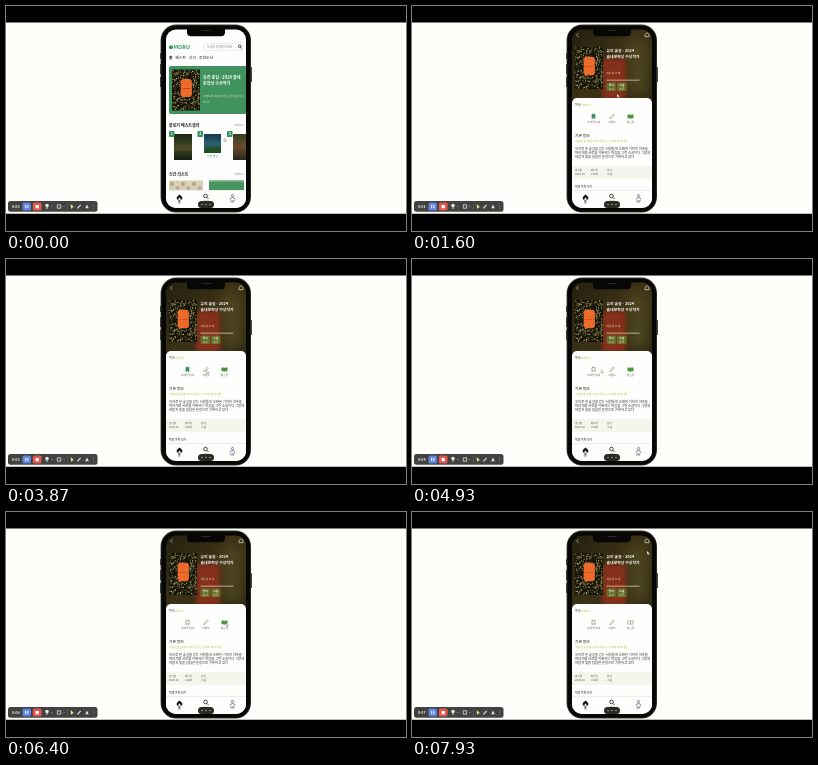
These frames come from a looping animation (400x225 px, 8 s). An HTML page with a canvas:

```html
<!DOCTYPE html>
<html lang="ko">
<head>
<meta charset="utf-8">
<style>
html, body { margin: 0; height: 100%; overflow: hidden; background: #000; }
canvas { display: block; width: 400px; height: 225px; }
</style>
</head>
<body>
<canvas id="stage" width="400" height="225"></canvas>
<script>
const ctx = document.getElementById('stage').getContext('2d');
const LOOP = 8000, OPEN_DETAIL = 1600, MARK_OFF = 4730, BOOK_OFF = 7270;
const GREEN = '#35935b', INK = '#1d1e1b', GRAY = '#7d7e76', OLIVE = '#b9b842', PAPER = '#fefefd';

// Pointer stops: time, x, y
const stops = [[0, 218, 132], [70, 218, 132], [1000, 205, 88], [1600, 205, 88],
  [2400, 232, 93], [2470, 232, 93], [3270, 201, 111], [3800, 201, 111],
  [4600, 182, 111], [4730, 182, 111], [5470, 221, 109], [5800, 221, 109],
  [6070, 220, 111], [7200, 220, 111], [7670, 235, 39], [8000, 235, 39]];

function rect(x, y, w, h, fill, r = 0) {
  ctx.fillStyle = fill;
  ctx.beginPath();
  ctx.roundRect(x, y, w, h, r);
  ctx.fill();
}
function dot(x, y, r, fill) {
  ctx.fillStyle = fill;
  ctx.beginPath();
  ctx.arc(x, y, r, 0, 7);
  ctx.fill();
}
function path(d, x, y, stroke, fill, width = .8) {
  const p = new Path2D(d);
  ctx.save();
  ctx.translate(x, y);
  if (fill) { ctx.fillStyle = fill; ctx.fill(p); }
  if (stroke) { ctx.strokeStyle = stroke; ctx.lineWidth = width; ctx.stroke(p); }
  ctx.restore();
}
function text(s, x, y, size, fill = INK, weight = 400, align = 'left') {
  ctx.font = `${weight} ${size}px "Noto Sans CJK KR", "Noto Sans CJK", "Noto Sans", sans-serif`;
  ctx.fillStyle = fill;
  ctx.textAlign = align;
  ctx.textBaseline = 'middle';
  ctx.fillText(s, x, y);
}
function gradient(x0, y0, x1, y1, ...colors) {
  const g = ctx.createLinearGradient(x0, y0, x1, y1);
  colors.forEach((c, i) => g.addColorStop(i / (colors.length - 1), c));
  return g;
}
function softRect(x, y, w, h, fill, blur) {
  ctx.save();
  ctx.filter = `blur(${blur}px)`;
  rect(x, y, w, h, fill, 4);
  ctx.restore();
}
function searchIcon(x, y, k, color) {
  ctx.strokeStyle = color;
  ctx.lineWidth = .8;
  ctx.beginPath();
  ctx.arc(x - .5 * k, y - .5 * k, 1.8 * k, 0, 7);
  ctx.moveTo(x + .8 * k, y + .8 * k);
  ctx.lineTo(x + 2.5 * k, y + 2.5 * k);
  ctx.stroke();
}

function speckledCover(x, y, w, h) {
  let seed = 17;
  const rnd = () => (seed = seed * 16807 % 2147483647) / 2147483647;
  rect(x, y, w, h, '#17160c');
  for (let i = 0; i < 330; i++) {
    const px = x + rnd() * (w - 1), py = y + rnd() * (h - 1);
    ctx.fillStyle = ['#b9a75c', '#71642c', '#d8cb91'][i % 3];
    ctx.fillRect(px, py, .9, .8);
  }
  rect(x + w * .31, y + h * .23, w * .4, h * .44, '#ee6a2a', 3);
  rect(x + w * .37, y + h * .45, w * .28, .7, '#a94119');
}

function listPage() {
  rect(160, 23, 80, 180, PAPER);
  dot(165, 41.3, 2, GREEN);
  text('MORU', 167.5, 41.3, 5.4, GREEN, 900);
  rect(197.5, 37, 40, 8, '#d9dfd4', 4);
  rect(198, 37.5, 39, 7, PAPER, 3.5);
  text('도서를 검색해 보세요', 201, 41, 2.9, GRAY);
  searchIcon(234, 40.7, .7, INK);
  text('홈', 163, 51.3, 3.8, INK, 700);
  text('베스트', 169.5, 51.3, 3.8);
  text('신간', 183, 51.3, 3.8);
  text('추천도서', 193, 51.3, 3.8);

  rect(163, 60, 80, 48, '#40935f', 2);
  speckledCover(166, 63.5, 28, 41);
  text('유리 숲길 - 2024 솔내', 197, 71, 4.1, '#fff', 700);
  text('문학상 수상작가', 197, 77, 4.1, '#fff', 700);
  text('오래도록 마음에 남는 문장들을 담은', 197, 90, 2.8, '#d5e5a8');
  text('더보기', 197, 96.5, 2.5, '#d5e5a8');

  text('블로거 베스트셀러', 163, 119.3, 4, INK, 700);
  text('전체보기', 238, 119.5, 2.6, GRAY, 400, 'right');
  rect(168, 128, 18, 26, gradient(0, 128, 0, 154, '#1d2517', '#3d4a24', '#171c14'));
  rect(168, 139, 18, 6, '#4a4721');
  rect(198, 128, 17, 19, gradient(0, 128, 0, 147, '#18384b', '#286070', '#1c5034'));
  path('M0 8 Q7 2 17 5 V10 H0Z', 198, 137, null, '#234d25');
  text('푸른 언덕', 206.5, 150, 2.8, GREEN, 400, 'center');
  text('· · · ·', 206.5, 153, 2.8, GRAY, 400, 'center');
  rect(227, 128, 13, 26, gradient(0, 128, 0, 154, '#344022', '#6a4b2c', '#242719'));
  [163, 191.5, 221].forEach((x, i) => {
    rect(x, 125, 5.5, 6, GREEN, .8);
    text(i + 1, x + 2.75, 128, 3.5, '#fff', 700, 'center');
  });

  text('신간 리스트', 163, 168, 4, INK, 700);
  text('전체보기', 238, 168, 2.6, GRAY, 400, 'right');
  rect(163, 174.5, 34, 12, '#d8cfb7');
  for (let i = 0; i < 6; i++) {
    dot(166 + i * 5.5, 178 + i % 2 * 4, 2, i % 2 ? '#c5a5a0' : '#aaa982');
  }
  rect(203, 174.5, 35, 12, '#46945f');
  rect(203, 174.5, 35, 1.5, '#78ae7e');
}

function detailHeader() {
  rect(160, 23, 80, 78, gradient(160, 23, 240, 94, '#232010', '#3c3115', '#2b2813'));
  softRect(216, 34, 20, 55, '#4d451f', 6);
  softRect(190, 52, 24, 42, '#85301a', 2);
  path('M1.5 -2 L-.5 0 L1.5 2', 165, 29, '#d2d1bd', null, .6);
  path('M-2 -.3 L0 -2 L2 -.3 V2 H-2Z', 235, 28.7, '#e4e3d0', null, .7);
  speckledCover(163, 41, 28, 42);
  text('유리 숲길 - 2024', 194.5, 44.7, 3.9, '#fff', 700);
  text('솔내문학상 수상작가', 194.5, 50.2, 3.9, '#fff', 700);
  text('지은이 소개', 194.5, 66.5, 2.8, '#f0ecd2', 500);
  rect(194.5, 73.8, 33, .8, '#d9d5b8');
  [194.5, 205].forEach((x, i) => {
    rect(x, 76.5, 9.5, 8.5, '#65702d', 1.2);
    text(i ? '소설' : '종이', x + 4.75, 79.2, 2.8, '#f5f2d8', 700, 'center');
    text(i ? '한국' : '도서', x + 4.75, 82.6, 2.6, '#f5f2d8', 400, 'center');
  });
}

function detailPage(t) {
  detailHeader();
  rect(160, 92, 80, 111, PAPER, [5, 5, 0, 0]);
  text('독서', 163, 99.3, 3, INK, 500);
  text('기록하기', 168.5, 99.3, 2.7, OLIVE);

  const marked = t < MARK_OFF, reading = t < BOOK_OFF, soft = '#7e936c';
  path('M-1.5 -2.2 H1.5 V2.3 L0 1 L-1.5 2.3Z', 181.5, 110.5,
    marked ? GREEN : soft, marked ? GREEN : null, .7);
  path('M-2.2 2.2 L-1.7 .5 L1.4 -2.5 L2.4 -1.5 L-.6 1.6Z', 200, 110.5, '#78a252', null, .6);
  path('M0 -1.4 Q-1.4 -2 -2.7 -1.6 V1.6 Q-1.4 1.2 0 1.8 Q1.4 1.2 2.7 1.6 V-1.6 Q1.4 -2 0 -1.4 V1.8',
    218.5, 110.5, reading ? '#4d973c' : soft, reading ? '#4d973c' : null, .6);
  [['내 책꽂이에', 181.5], ['코멘트', 200], ['읽는중', 218.5]].forEach(([s, x]) =>
    text(s, x, 116.3, 2.7, '#62685a', 400, 'center'));

  text('기본 정보', 163, 129.3, 3.8, INK, 500);
  text('조용한 숲길에서 다시 만나는 우리의 이야기들', 163, 135.3, 2.8, OLIVE);
  ['유리로 된 숲길을 걷는 사람들의 오래된 기억과 약속을',
    '따라가며 서로를 이해하는 마음을 그린 소설이다 그날의',
    '바람과 빛을 담담한 문장으로 기록하고 있다'].forEach((s, i) =>
    text(s, 163, 142.3 + i * 4.4, 3.35, '#2d2e2a'));
  rect(160, 160, 80, 13, '#f5f5ee');
  [['출간일', '2024.10'], ['페이지', '216쪽'], ['분야', '소설']].forEach(([a, b], i) => {
    text(a, 163 + i * 16, 164.2, 2.6, '#606156');
    text(b, 163 + i * 16, 168.2, 2.7, '#484940');
  });
  text('책의 목차 보기', 163, 180.5, 2.9, INK);
}

function tabBar() {
  rect(160, 184, 80, 19, PAPER);
  rect(160, 184, 80, .4, '#dedfd6');
  path('M-2.7 0 L0 -2.5 L2.7 0 V2.6 H.8 V.8 H-.8 V2.6 H-2.7Z', 173.5, 190.9, null, '#111');
  searchIcon(200, 190.5, 1, INK);
  path('M0 -2.6 A1.2 1.2 0 1 1 -.01 -2.6 M-2.4 2.5 Q-2.2 .6 0 .6 Q2.2 .6 2.4 2.5',
    226.5, 191, '#4d4f70', null, .7);
  text('홈', 173.5, 196, 3, INK, 700, 'center');
  text('검색', 200, 196, 3, GRAY, 400, 'center');
  text('MY', 226.5, 196, 3, INK, 400, 'center');
}

function phone(t) {
  [[154, 47, 6], [154, 58, 10], [154, 71, 10], [244, 61, 15]].forEach(([x, y, h]) =>
    rect(x, y, 2, h, '#45463c', .6));
  rect(154.6, 18.6, 90.4, 187.9, '#34362a', 15.5);
  rect(155.4, 19.4, 88.8, 186.3, '#070705', 14.7);
  ctx.save();
  ctx.beginPath();
  ctx.roundRect(160, 23.5, 80, 178.5, 10);
  ctx.clip();
  t < OPEN_DETAIL ? listPage() : detailPage(t);
  tabBar();
  ctx.restore();
  rect(181, 21, 38, 9.3, '#070705', [0, 0, 4, 4]);
  rect(195, 24, 10, 1, '#272a20', .5);
  rect(192, 195, 16, 7, '#292a23', 3.5);
  [196, 200, 204].forEach(x => dot(x, 198.5, .7, '#b5b58f'));
}

function toolbar(t) {
  const light = '#e2e2dc';
  rect(2, 195, 89.5, 10.8, '#424240', 2.5);
  text('0:0' + Math.floor(t / 1000), 6, 200.6, 3.6, '#f4f4ef', 700);
  rect(16.5, 196.5, 8.5, 8, '#5b82e0', 1.5);
  rect(19.2, 198.8, 1, 3.4, '#fff');
  rect(21.4, 198.8, 1, 3.4, '#fff');
  rect(26.8, 196.5, 8.7, 8, '#e2574a', 1.5);
  rect(29.6, 199, 3.2, 3.2, '#fff', .5);
  dot(41, 199.5, 1.8, light);
  rect(40.5, 200, 1, 3, light);
  dot(46, 200.5, .6, '#aaa');
  path('M-1.7 -1.7 H1.7 V1.7 H-1.7Z', 53, 200.5, light);
  dot(58, 200.5, .6, '#aaa');
  rect(61, 197, .5, 7, '#666');
  path('M-1.3 -2.4 L2 .8 L.3 .9 L-1 2.4Z', 66, 200.5, null, '#efe98c');
  path('M-1.6 1.8 L1.6 -1.7', 73, 200.5, light, null, 1.2);
  path('M-1.8 1.7 L0 -2 L1.8 1.7Z', 81, 200.5, null, light);
  [199, 200.7, 202.4].forEach(y => dot(87.5, y, .45, '#aaa'));
}

function pointer(t) {
  const i = stops.findIndex(s => s[0] > t);
  const [t0, x0, y0] = stops[i - 1], [t1, x1, y1] = stops[i];
  const k = (t - t0) / (t1 - t0), e = k * k * (3 - 2 * k);
  path('M0 0 V3.4 L.9 2.6 L1.5 3.9 L2.1 3.6 L1.5 2.4 H2.6Z',
    x0 + (x1 - x0) * e, y0 + (y1 - y0) * e, '#77786e', '#fff', .4);
}

function draw(now) {
  const t = now % LOOP;
  rect(0, 0, 400, 225, '#000');
  rect(0, 16.4, 400, 191.4, '#fefefb');
  phone(t);
  toolbar(t);
  pointer(t);
  requestAnimationFrame(draw);
}
requestAnimationFrame(draw);
</script>
</body>
</html>
```
